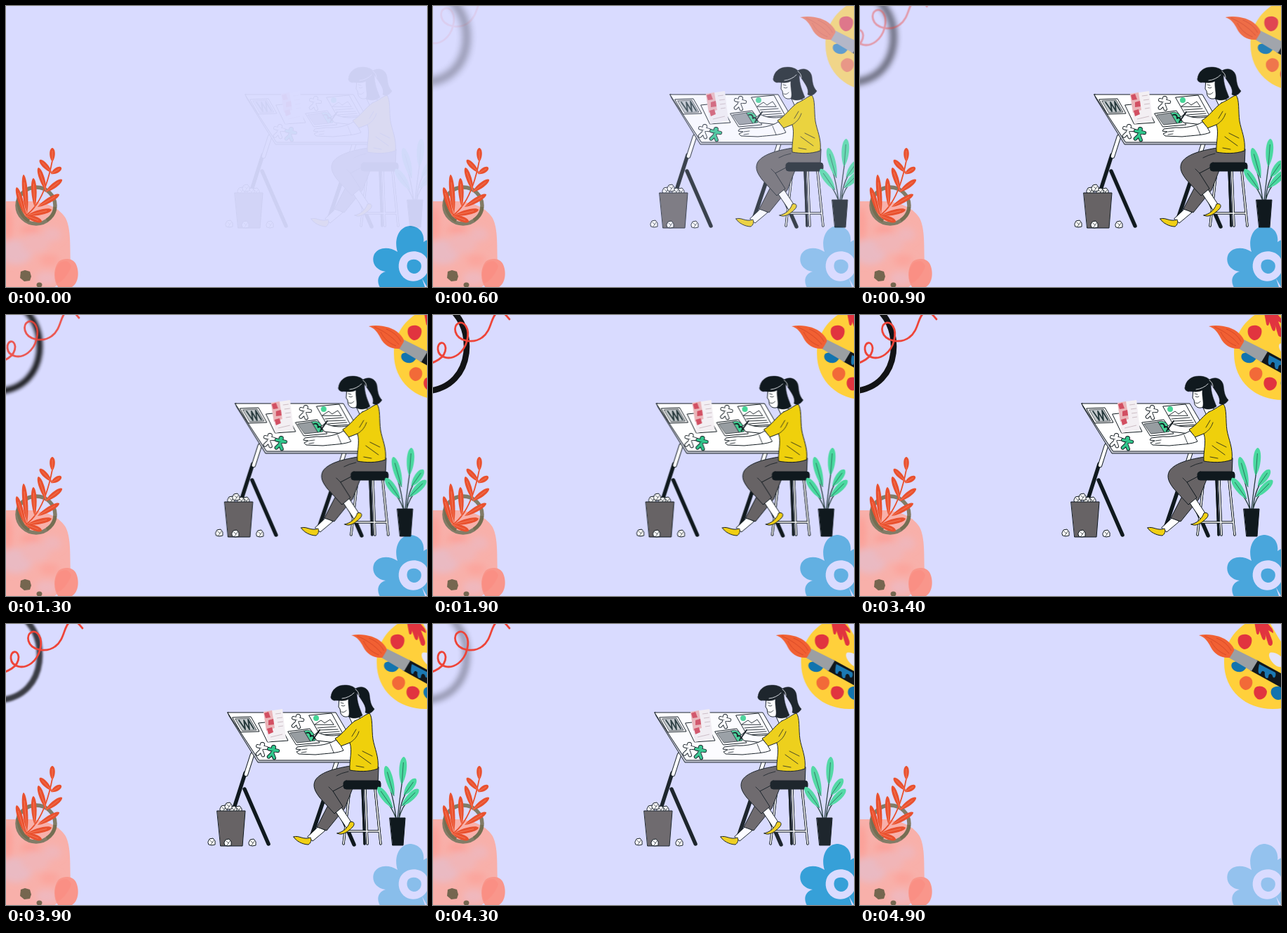
These frames come from a looping animation (600x400 px, 5 s). An HTML page:

```html
<!DOCTYPE html>
<html lang="en">
<head>
<meta charset="utf-8">
<title>Art studio</title>
<style>
html, body { margin: 0; width: 100%; height: 100%; overflow: hidden; background: #d9dbff; }
svg { display: block; width: 100%; height: 100%; }
.ink { stroke: #10191e; stroke-width: 1; stroke-linejoin: round; stroke-linecap: round; }
.line { fill: none; }
.move { animation: 5s linear infinite; }
#scene { animation-name: fade; }
#slide { animation-name: slide; }
#flower { animation-name: pulse; animation-timing-function: cubic-bezier(.37, 0, .63, 1); }
#palette { animation-name: drift; }
#hoop { animation-name: focus; }
#squiggle { animation-name: swing; }

@keyframes fade {
  0% { opacity: .05 }
  15.4%, 85.2% { opacity: 1 }
  97%, 100% { opacity: 0 }
}
@keyframes slide {
  0% { transform: translateX(25px); animation-timing-function: cubic-bezier(.455, .03, .515, .955) }
  49%, 100% { transform: none }
}
@keyframes pulse {
  0%, 21.6%, 43.2%, 64.8%, 86.4% { opacity: 1 }
  10.8%, 32.4%, 54%, 75.6%, 97.2%, 100% { opacity: .42 }
}
@keyframes drift {
  0% { transform: translateX(46px); opacity: 0 }
  20% { opacity: 1 }
  100% { transform: translateX(-1px); opacity: 1 }
}
@keyframes focus {
  0% { filter: blur(8px); opacity: 0 }
  12% { opacity: .45 }
  26% { opacity: .95 }
  38%, 74% { filter: blur(0); opacity: 1 }
  94%, 100% { filter: blur(7px); opacity: 0 }
}
@keyframes swing {
  0% { transform: translate(-34px, -14px); opacity: 0 }
  12% { transform: translate(-20px, -8px); opacity: .08 }
  26% { transform: translate(-5px, -2px); opacity: .88 }
  36%, 86% { transform: none; opacity: 1 }
  97%, 100% { transform: none; opacity: 0 }
}
</style>
</head>
<body>
<svg viewBox="0 0 600 400" preserveAspectRatio="none">
  <defs>
    <filter id="soft" x="-50%" y="-50%" width="200%" height="200%"><feGaussianBlur stdDeviation="5"/></filter>
    <clipPath id="washClip"><path id="wash" d="M-2 278H34C60 279 77 289 85 302C93 317 91 345 92 362C90 380 80 394 66 402H-2Z"/></clipPath>
    <g id="doll" stroke-linecap="round" stroke-linejoin="round" fill="none">
      <path d="M0-4V2M-6-3H7M0 2L-4 8M0 2L4 8" stroke="#10191e" stroke-width="5.4"/>
      <circle cy="-6.500" r="3.600" fill="#10191e"/>
      <path d="M0-4V2M-6-3H7M0 2L-4 8M0 2L4 8" stroke="currentColor" stroke-width="3.6"/>
      <circle cy="-6.500" r="2.700" fill="currentColor"/>
    </g>
    <g id="ball" class="ink">
      <path d="M-5 0L-3-4L2-5L5-1L5 4L0 5L-4 4Z" fill="#fff"/>
      <path class="line" d="M-2-2L1 1L3-2M1 1L-1 4" stroke-width=".7"/>
    </g>
  </defs>

  <rect width="600" height="400" fill="#d9dbff"/>

  <!-- watercolour corner -->
  <use href="#wash" fill="#f8b0aa"/>
  <g clip-path="url(#washClip)">
    <g filter="url(#soft)">
      <ellipse cx="14" cy="350" rx="24" ry="18" fill="#eabac2"/>
      <ellipse cx="42" cy="338" rx="20" ry="14" fill="#f1b5b7"/>
      <ellipse cx="66" cy="325" rx="13" ry="10" fill="#f0b6ba"/>
      <ellipse cx="34" cy="318" rx="14" ry="5" fill="#fc9f96"/>
      <ellipse cx="2" cy="310" rx="7" ry="24" fill="#fca098"/>
      <ellipse cx="62" cy="362" rx="14" ry="8" fill="#fba59d"/>
      <ellipse cx="58" cy="388" rx="16" ry="10" fill="#f0b8bd"/>
    </g>
  </g>
  <path d="M76 363C84 358 96 359 100 368C105 379 103 395 94 400L75 401C67 392 67 372 76 363Z" fill="#f9968b"/>
  <path d="M76 366C83 361 91 363 93 371C88 383 82 391 73 395C68 386 69 373 76 366Z" fill="#fb8a7f" opacity=".55"/>
  <path d="M21 378L27 376L34 378L36 385L34 391L26 392L20 387Z" fill="#75664f"/>
  <ellipse cx="47.500" cy="397" rx="4" ry="3.500" fill="#75664f"/>
  <ellipse cx="43" cy="284" rx="27" ry="26" fill="none" stroke="#827c67" stroke-width="5.500"/>
  <path d="M18 271C16 287 22 300 33 306M58 305C66 300 70 293 70 286" fill="none" stroke="#756e52" stroke-width="4.500"/>
  <g id="fern" fill="#e9512f">
    <path d="M27 299C44 288 58 262 66 220M65 238L62 233M29 298C25 288 22 275 19 268" fill="none" stroke="#e9512f" stroke-width="1.800"/>
  </g>

  <!-- flower -->
  <g id="flower" class="move">
    <path d="M575 313C590 313 597 325 595 336C602 331 612 330 620 338V405H536C526 393 530 381 541 378C526 376 520 364 525 353C531 343 546 342 558 350C553 335 558 315 575 313Z" fill="#36a0d8"/>
    <path d="M562 360C568 350 580 347 590 351C601 355 605 368 600 380C594 391 580 395 570 389C560 383 557 370 562 360ZM593 388L600 400H597Z" fill="#d9dbff"/>
    <path d="M573 364C578 359 587 360 591 366C594 373 589 381 581 381C573 380 569 371 573 364Z" fill="#36a0d8"/>
  </g>

  <!-- drawing desk -->
  <g id="scene" class="move"><g id="slide" class="move">
    <g class="ink">
      <path class="line" d="M471 197L463 222" stroke-width="6.500"/>
      <path class="line" d="M471 197L463 222" stroke="#fff" stroke-width="4.500"/>
      <path class="line" d="M462 223L435 303M461 234L496 314M341 212L324 265M340 235L374 313" stroke-width="5.500"/>
      <path class="line" d="M351 186L342 214" stroke-width="6.500"/>
      <path class="line" d="M351 186L342 214" stroke="#fff" stroke-width="4.500"/>
      <path d="M316 126L318 131L359 197H512V193Z" fill="#c8cad6"/>
      <path d="M316 126H470L510 194H361Z" fill="#fff"/>
    </g>

    <g class="ink" fill="#fff">
      <path d="M323 133L349 132L361 153L335 154Z"/>
      <path d="M327 135L347 134L357 151L337 152Z" fill="#c3c8cb" stroke-width=".7"/>
      <path class="line" d="M332 137L341 150L339 137L347 150L345 136L353 149" stroke="#24373a" stroke-width="1.800"/>
      <path d="M360 141L388 138L402 166L373 168Z"/>
      <path d="M432 130L464 127L480 156L448 158Z"/>
      <circle cx="442" cy="134" r="4" fill="#45d496" stroke="none"/>
      <path class="line" d="M440 143L449 137L454 141L462 136L467 143ZM444 148L470 146M446 151L473 150M448 155L475 153" stroke-width=".9"/>
      <path d="M402 153L433 149L447 169L414 172Z"/>
      <path d="M405 155L425 152L434 167L415 169Z" fill="#979da1" stroke-width=".7"/>
      <path d="M425 152C431 150 437 152 439 158L441 166L434 167Z" fill="#44d195" stroke-width=".7"/>
      <path class="line" d="M428 155Q434 153 434 160Q438 157 439 163" stroke-width="1.800"/>
    </g>
    <path d="M367 125L394 121L399 163L373 168Z" fill="#f3eff3"/>
    <path d="M367 125L379 123L383 148L371 152Z" fill="#eab5b9"/>
    <path d="M368 127L374 125L377 133L370 134ZM374 137L381 135L382 143L374 144ZM372 149L379 147L381 154L374 157Z" fill="#d24f62"/>
    <path d="M384 128L392 127M386 134L394 133M387 140L395 139M388 146L395 145M377 161L394 157" stroke="#cdbec5" stroke-width="1"/>
    <use href="#doll" transform="translate(415 138) rotate(12)" color="#fff"/>
    <use href="#doll" transform="translate(364 178) rotate(12)" color="#fff"/>
    <use href="#doll" transform="translate(380 182) rotate(12)" color="#31c68c"/>

    <g class="ink">
      <use href="#ball" x="310" y="263"/><use href="#ball" x="331" y="264"/>
      <use href="#ball" x="324" y="264"/><use href="#ball" x="317" y="259"/>
      <path d="M301 266H341L337 316H306Z" fill="#676365"/>
      <use href="#ball" x="293" y="310"/><use href="#ball" x="316" y="311"/><use href="#ball" x="351" y="311"/>
    </g>

    <!-- stool -->
    <g class="ink line">
      <path id="legs" d="M490 235L481 313M508 235L511 313M512 235L515 313M526 235L534 313M484 295H532" stroke-width="3.200"/>
      <use href="#legs" class="inner"/>
      <path d="M490 235L481 313M512 235L515 313M526 235L534 313M484 295H532" stroke="#fff" stroke-width="1.600"/>
    </g>

    <!-- woman -->
    <g class="ink" fill="#fff">
      <path d="M446 288L455 294L437 309L430 303Z"/>
      <path d="M410 303C417 300 424 308 434 304C436 308 434 312 431 314C423 314 413 309 410 303Z" fill="#f0cf14"/>
      <path d="M468 226L494 234L483 262L457 294L443 289L459 258Z" fill="#676365"/>
      <path d="M470 267L478 261L492 282L486 291Z"/>
      <path d="M472 298C480 296 487 291 490 282C496 280 498 285 494 289C488 295 480 302 472 298Z" fill="#f0cf14"/>
      <path d="M491 202C472 205 449 210 441 222C436 231 441 239 447 247L468 270L480 260L466 238L485 228H530L531 204Z" fill="#676365"/>
      <path class="line" d="M466 238L460 232M488 210Q478 212 471 216" stroke-width=".8"/>
      <rect x="481" y="223" width="53" height="12" rx="4" fill="#10191e"/>
      <path d="M487 127L501 123L505 137L495 144Z"/>
      <path d="M476 158C464 160 453 159 444 154L438 159L443 166L470 169Z"/>
      <path class="line" d="M437 165L447 151" stroke-width="1.800"/>
      <path d="M497 138C507 134 513 128 518 127C523 133 521 150 523 164C525 176 532 190 530 206C516 211 502 210 490 208C489 194 494 181 490 169L477 174L469 163C480 157 486 146 497 138Z" fill="#efd00c"/>
      <path class="line" d="M490 169C495 166 500 162 503 153M493 160L499 150M502 186L520 199M508 181L522 188M499 202L510 204" stroke-width=".8"/>
      <path d="M470 165C462 171 445 174 432 173L415 175L413 178L420 179L414 182L417 185L441 186C459 184 472 184 481 180L477 173Z"/>
      <path class="line" d="M462 171L467 183M421 179L429 178M421 183L428 182" stroke-width=".8"/>
      <path d="M475 104L474 118L476 121L477 127C479 132 485 134 491 130L493 103Z"/>
      <path class="line" d="M477 112L481 113M478 116Q481 118 483 116M478 125Q482 127 485 123" stroke-width=".8"/>
      <path d="M463 104C464 93 472 87 483 87C490 87 495 89 498 92C509 86 517 93 518 101C519 110 520 116 525 121C522 126 517 129 512 126C515 117 506 108 500 98C500 111 504 120 508 130C502 135 494 135 488 132C491 126 487 117 488 107C481 111 473 108 468 109C465 108 463 107 463 104Z" fill="#10191e" stroke-width=".5"/>
      <path class="line" d="M479 106Q489 105 496 98M498 93Q503 96 503 102" stroke="#e8ebf0" stroke-width=".9"/>
    </g>

    <g id="pot">
      <path d="M556 277Q553 252 547 233M558 277Q562 240 566 216M560 277Q562 250 574 235M556 277Q550 260 538 248M560 277Q564 260 576 248" fill="none" stroke="#253b3a" stroke-width="1.300"/>
    </g>
    <path class="ink" d="M547 276H569L566 315H551Z" fill="#10191e"/>
  </g></g>

  <!-- palette and brush -->
  <g id="palette" class="move">
    <path d="M555-4C530 10 519 32 519 55C519 95 550 121 588 121C630 121 660 92 660 60L614 40C600 29 594 15 583-4Z" fill="#ffd03b"/>
    <path d="M584 41C591 39 602 45 607 55C606 63 596 63 590 57C585 52 581 45 584 41Z" fill="#e4e4fa"/>
    <g fill="#e1343f">
      <path d="M540 18C545 13 555 14 558 20C560 27 555 36 548 36C541 35 536 25 540 18Z"/>
      <path d="M563 91C569 86 578 89 580 96C580 104 573 109 567 107C561 103 560 96 563 91Z"/>
      <path d="M562-3L565 13C567 18 570 13 569 9L573 20C576 26 580 22 577 13L582 29C586 34 590 29 587 22L582 9L589 13C590 7 583 2 579-3Z"/>
    </g>
    <path d="M542 79C547 72 556 73 559 80C561 88 555 94 549 94C542 92 539 84 542 79Z" fill="#f26a38"/>
    <path d="M531 55C538 51 548 54 551 60C549 68 541 70 535 67C529 64 528 58 531 55ZM587 92C594 86 604 89 606 97C606 106 598 110 592 107C586 103 584 97 587 92Z" fill="#1274ae"/>
    <path d="M565 51L660 103L652 119L556 66Z" fill="#11171c"/>
    <path d="M569 57L592 69C594 74 590 80 588 74C586 69 582 71 582 76C579 80 576 74 577 69C574 65 572 68 571 71C567 72 567 66 569 57Z" fill="#1b79b3"/>
    <path d="M533 35L567 52L558 67L526 48Z" fill="#9b9fa3"/>
    <path d="M483 16C498 13 517 17 526 26C531 31 534 35 533 38L527 48C515 49 505 43 500 33C496 25 492 19 483 16Z" fill="#f16033"/>
    <path d="M491 17C503 22 516 30 526 42M500 24C505 34 512 40 522 44M508 20C518 24 525 30 529 38" fill="none" stroke="#d94a28" stroke-width="1"/>
  </g>

  <!-- top-left doodle -->
  <g id="hoop" class="move">
    <path d="M26-8C43 8 50 30 47.500 54C44 82 26 105-8 108.500" fill="none" stroke="#121315" stroke-width="8.500"/>
  </g>
  <g id="squiggle" class="move">
    <path d="M-20 74C4 68 18 61 18 47C17 36 6 38 7 49C8 61 24 65 36 56C49 46 53 26 47 16C41 6 29 12 32 24C36 38 58 41 70 32C84 22 82 3 91-3C98-8 104 0 109 6" fill="none" stroke="#ee4438" stroke-width="2.800" stroke-linecap="round"/>
  </g>
</svg>
<script>
const NS = 'http://www.w3.org/2000/svg';

// Leaf from base (x1, y1) to tip (x2, y2) with a centre vein.
function leaf(host, [x1, y1, x2, y2], width, fill, vein) {
  const dx = x2 - x1, dy = y2 - y1, k = width / Math.hypot(dx, dy) * .67;
  const at = (u, side) => `${x1 + dx * u - dy * k * side} ${y1 + dy * u + dx * k * side}`;
  const add = (d, attrs) => {
    const p = document.createElementNS(NS, 'path');
    p.setAttribute('d', d);
    for (const a in attrs) p.setAttribute(a, attrs[a]);
    host.append(p);
  };
  add(`M${x1} ${y1}C${at(.3, 1)} ${at(.95, 1)} ${x2} ${y2}C${at(.95, -1)} ${at(.3, -1)} ${x1} ${y1}Z`, { fill });
  add(`M${x1} ${y1}L${at(.8, 0)}`, { stroke: vein, 'stroke-width': .8, fill: 'none' });
}

const fern = document.getElementById('fern');
[
  [66, 222, 66, 202], [65, 237, 48, 219], [64, 239, 79, 230],
  [57, 263, 46, 230], [56, 265, 80, 247], [45, 286, 76, 268],
  [41, 286, 39, 245], [30, 296, 25, 240], [27, 298, 15, 258],
  [30, 298, 65, 290], [27, 298, 51, 307]
].forEach(p => leaf(fern, p, 7.5, '#e9512f', '#f58263'));

const pot = document.getElementById('pot');
[
  [564, 229, 567, 189], [553, 245, 541, 202], [567, 244, 584, 220],
  [551, 262, 530, 232], [564, 259, 588, 235]
].forEach(p => leaf(pot, p, 10.5, '#4ad9a0', '#24584f'));
</script>
</body>
</html>
```
